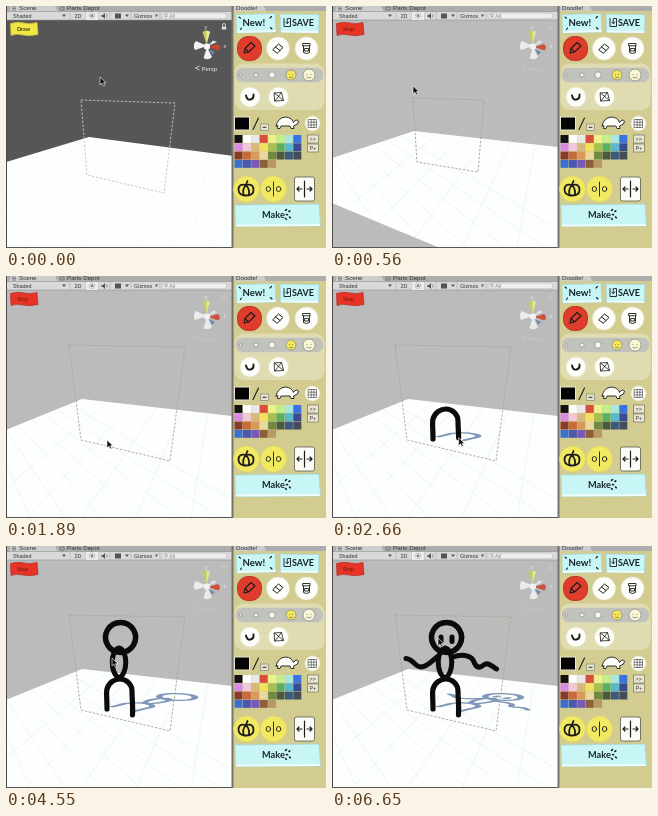
Write an HTML page that moves like this. It is 320 by 242 pixels and loops after 6.79 s.

```html
<!DOCTYPE html>
<html lang="en">
<head>
<meta charset="utf-8">
<title>Doodle in a scene</title>
<style>
  html, body { margin: 0; width: 100%; height: 100%; overflow: hidden; background: #d2cc90; }
  svg { display: block; width: 100vw; height: 100vh; }
  text { font-family: "Liberation Sans", Arial, sans-serif; font-size: 5.4px; fill: #333; }
  .hand { font-family: Lato, "Open Sans", sans-serif; font-weight: 700; fill: #16242a; }
  .line { fill: none; stroke: #1b1b1b; stroke-linecap: round; stroke-linejoin: round; }
  .round { fill: #fdfdf9; stroke: #e8e4c6; stroke-width: .8; }
  .cyan { fill: #c8f5f6; stroke: #9fd6da; stroke-width: .7; }
  .lip { fill: none; stroke: #eefcfb; stroke-width: 1.8; }
  .sun { fill: #f2e963; stroke: #dfd46c; stroke-width: .8; }
</style>
</head>
<body>
<svg viewBox="0 0 320 242" preserveAspectRatio="none">
  <defs><clipPath id="view"><rect x="1" y="14" width="225" height="227"/></clipPath></defs>

  <g clip-path="url(#view)">
    <rect id="sky" x="0" y="14" width="227" height="228"/>
    <path id="floor" fill="#fdfefe"/>
    <path id="grid" fill="none" stroke="#e9f1f4" stroke-width=".7"/>
    <path id="gap"/>
    <use href="#ink" transform="matrix(.953 .157 -.719 .164 127.7 118)" stroke="#7f97b8"/>
    <path id="sheet" fill="none" stroke-width=".9" stroke-dasharray="2.4 1.6"/>
    <g stroke="#0b0b0b"><g id="ink" fill="none" stroke-linecap="round" stroke-linejoin="round"></g></g>

    <g id="gizmo">
      <path d="M201 40L190 35Q186 39 189 44Z" fill="#f2f2f2"/>
      <path d="M201 41L197.500 52Q202 55 206 51Z" fill="#f0f0f0"/>
      <path d="M202 40L207 34.500L211 36Z" fill="#e8e8e8"/>
      <path d="M202 41L212 38Q215.500 41 212.500 44.500Z" fill="#cd4630"/>
      <path d="M203 43L209 46L206 49Z" fill="#6a86ac"/>
      <path d="M200.500 38L196.500 26Q200 23 204 26Z" fill="#c6cf52"/>
      <path d="M200.500 38L200.500 24.500Q203 24.500 204 26Z" fill="#e6e9a0"/>
      <rect x="198" y="37.500" width="6" height="6" rx="2" fill="#f7f7f7"/>
      <text x="198.500" y="22.500" style="fill:#eee">y</text>
      <text x="217.500" y="42" style="fill:#eee">x</text>
    </g>
    <g id="persp" fill="none" stroke="#e9e9e9" stroke-width=".8">
      <path d="M193.500 60L189.500 62L193.500 64"/>
      <text x="195.500" y="64.500" stroke="none" style="fill:#e9e9e9;font-size:6px">Persp</text>
      <path d="M216.500 20.500V19a1.500 1.500 0 0 1 3 0V20.500"/>
      <rect x="215.800" y="20.500" width="4.400" height="3" fill="#ddd" stroke="none"/>
    </g>
    <path id="mode" d="M4.500 17.500Q12 15.500 18 17T31 16.500L32 28.500Q24 30.500 17 29T5 29.500Z" stroke-width=".7"/>
    <text id="modeText" class="hand" x="11" y="24.800"></text>
  </g>

  <!-- window frame -->
  <rect width="320" height="6" fill="#adadad"/>
  <path d="M3 6L5 0H49L52 6Z" fill="#cdcdcd"/>
  <rect y="5.500" width="226" height="8.500" fill="#d9d9d9"/>
  <path d="M0 14H226M0 5.500H226" stroke="#909090" stroke-width=".6"/>
  <path d="M0 0V242" stroke="#4a4a4a" stroke-width="2"/>
  <path d="M0 241.500H226" stroke="#555"/>
  <path d="M6 1h4M6 2.500h4M6 4h4M54 1h4v3h-4z" stroke="#555" stroke-width=".6" fill="none"/>
  <text x="13" y="4" style="font-size:6.200px">Scene</text>
  <text x="61" y="4" style="font-size:6.200px">Parts Depot</text>
  <text x="7" y="11.500">Shaded</text>
  <path d="M56 8.500h4l-2 2.500zM119 8.500h4l-2 2.500zM149 8.500h3l-1.500 2.500z" fill="#555"/>
  <path d="M64 6V14M80 6V14M92 6V14M104 6V14M125 6V14M154 6V14" stroke="#b0b0b0" stroke-width=".6"/>
  <rect x="80" y="6" width="12" height="8" fill="#ececec"/>
  <text x="68.500" y="11.700">2D</text>
  <circle cx="86" cy="9.800" r="1.500" fill="#888"/>
  <circle cx="86" cy="9.800" r="2.800" fill="none" stroke="#888" stroke-dasharray=".9 1.300"/>
  <path d="M95.500 9h1.500l2-2v6l-2-2h-1.500zM109 7.500h6v5h-6z" fill="#555"/>
  <path d="M100.500 8.300q1.500 1.500 0 3" fill="none" stroke="#555" stroke-width=".6"/>
  <text x="128" y="11.700">Gizmos</text>
  <rect x="156" y="7" width="65" height="5.800" rx="2.900" fill="#eee" stroke="#aaa" stroke-width=".5"/>
  <circle cx="160" cy="9.500" r="1.400" fill="none" stroke="#777" stroke-width=".6"/>
  <text x="163" y="11.600" style="fill:#888">All</text>

  <!-- tool panel -->
  <rect x="226" y="5" width="94" height="237" fill="#d2cc90"/>
  <rect x="225.500" width="2" height="242" fill="#77756a"/>
  <path d="M228 0H258L260 5H228Z" fill="#cbcbcb"/>
  <text x="230" y="3.700" style="font-size:6.200px">Doodle!</text>

  <path class="cyan" d="M230 8.500L269 7.500L270 26L230.500 27Z"/>
  <path class="cyan" d="M274 8L313 8.500L312.500 26.500L274.500 26Z"/>
  <path class="lip" d="M231 26L269.500 25M275 25.500L312 26"/>
  <path class="line" d="M233 11l1.500 1.200M265.500 10.500l-1.500 1.500M234.500 23.500l1-1.500M266 23l-1.500-1.500" stroke-width="1.100"/>
  <text class="hand" x="236.500" y="20" style="font-size:9.600px">New!</text>
  <path class="line" d="M278 12.500V20.500H284.500V12.500H282.500M281.300 12.500V17.500M279.700 16l1.600 1.700l1.600-1.700" stroke-width=".9"/>
  <text class="hand" x="286" y="20" style="font-size:9px">SAVE</text>

  <rect x="231.500" y="30.500" width="24" height="24" rx="10.500" fill="#e03c2c" stroke="#c03728"/>
  <path class="line" d="M238 47L239 42.500L245 36.500L249 40L242.500 46Z M239 42.500L242.500 46" stroke-width="1.100"/>
  <circle class="round" cx="272" cy="42.500" r="11.500"/>
  <path class="line" d="M267 43.500L272.500 38L277 41.500L271.500 47Z M269.500 41l4.500 3.500" stroke-width="1"/>
  <circle class="round" cx="300.500" cy="42.500" r="11.500"/>
  <path class="line" d="M297.500 40V46.500Q300.500 48.500 303.500 46.500V40M297 37.500H304V39.800H297ZM299 42.500h3.500v2.500h-3.500z" stroke-width=".9"/>

  <rect x="228.500" y="57.500" width="90" height="46.500" rx="9" fill="#dfdcb2"/>
  <rect x="229.500" y="61.500" width="88" height="15" rx="7" fill="#c2c2bc" stroke="#d9d6bb"/>
  <g fill="#f6f6f0" stroke="#777" stroke-width=".6">
    <circle cx="234.500" cy="69" r="1.300"/><circle cx="250" cy="69" r="2.100"/><circle cx="266" cy="69" r="3.200"/>
    <circle cx="285" cy="69" r="5" fill="#f4e85a"/><circle cx="303" cy="69" r="6" fill="#f8f6d4"/>
  </g>
  <path d="M283.500 68v1M286.500 68v1M283 71q2 1.500 4 0M301 68v1M305 68v1M300.500 71q2.500 2 5 0" fill="none" stroke="#555" stroke-width=".6"/>

  <circle class="round" cx="244" cy="91" r="10"/>
  <path class="line" d="M240 89.500Q241 94.500 244.500 93.500T247.500 88.500" stroke-width="1.900"/>
  <circle class="round" cx="272.500" cy="91" r="10"/>
  <path class="line" d="M268.500 87L275.500 86.500L277.500 94.500L269 95ZM268.500 87L277.500 94.500M275.500 86.500L269 95" stroke-width=".8"/>

  <rect x="228.500" y="111" width="15" height="13" fill="#050505" stroke="#e9e6d0"/>
  <path class="line" d="M247.500 122.500L252.500 112M247 123.500l1-2" stroke-width="1.100"/>
  <rect x="254.500" y="118" width="8" height="6.500" fill="#e7e3c8" stroke="#777" stroke-width=".6"/>
  <path class="line" d="M257 121.300h3" stroke-width=".9"/>
  <path class="line" d="M270 120Q272 111.500 279.500 111Q286 111.500 287.500 116.500Q290 112.500 292.500 115Q293 118.500 287.500 120L288 122.500H285L284 120H275L274 122.500H271.500L272 120Z" style="fill:#fdfdf9" stroke-width=".9"/>
  <circle class="round" cx="306.500" cy="117.500" r="7.500"/>
  <path class="line" d="M302.500 113.500h8v8h-8zM305.200 113.500v8M307.900 113.500v8M302.500 116.200h8M302.500 118.900h8" stroke-width=".5"/>
  <g id="palette"></g>
  <g fill="#e9e6d2" stroke="#77745c" stroke-width=".7">
    <rect x="301.500" y="129" width="11" height="8"/><rect x="301.500" y="138" width="11" height="8"/>
  </g>
  <text x="303.500" y="135">&gt;&gt;</text><text x="303.500" y="144">P+</text>

  <circle class="sun" cx="240.500" cy="183" r="13"/>
  <path class="line" d="M240 179Q232.500 177 232.500 184Q233 189.500 240 189.500Q247.500 189.500 247.500 184Q247.500 177 240 179ZM240 179Q235.500 184 238 189.500M240 179Q244.500 184 242.500 189.500M240 178.500L241.500 175" stroke-width="1.800"/>
  <circle class="sun" cx="267.500" cy="183" r="13"/>
  <path class="line" d="M267.500 176V190M264.600 183a2.200 2.500 0 1 1-4.400 0a2.200 2.500 0 1 1 4.400 0M274.800 183a2.200 2.500 0 1 1-4.400 0a2.200 2.500 0 1 1 4.400 0" stroke-width=".9"/>
  <rect x="288.500" y="171" width="20" height="24" rx="2" fill="#fcfcf7" stroke="#5a584a" stroke-width=".8"/>
  <path class="line" d="M298.500 175V191M296 183H291.500M293 181L291 183L293 185M301 183H305.500M304 181L306 183L304 185" stroke-width="1.200"/>

  <path class="cyan" d="M229 199L313 198L314.500 220L229.500 220.500Z"/>
  <path class="lip" d="M230 219.500L314 219"/>
  <text class="hand" x="256" y="211.500" style="font-size:9.200px">Make</text>
  <path class="line" d="M279.500 204.500l1-1M283 205.500l.8-.6M280.500 208.500l1 .3M283.500 211l.8.8M279.500 212.500l.8.800" stroke-width="1.600"/>

  <path id="cursor" d="M0 0V8L2 6.200L3.300 9L4.700 8.400L3.500 5.700H6Z" fill="#111" stroke="#fff" stroke-width=".6"/>
</svg>

<script>
const LOOP = 6790, STEP = 70;
const $ = id => document.getElementById(id);
const set = (el, attrs) => { for (const k in attrs) el.setAttribute(k, attrs[k]); return el; };
const make = (tag, attrs, parent) =>
  parent.appendChild(set(document.createElementNS('http://www.w3.org/2000/svg', tag), attrs));
const clamp = v => Math.min(1, Math.max(0, v));
const mix = (a, b, p) => a + (b - a) * p;
const smooth = p => p * p * (3 - 2 * p);
const blend = (a, b, p) => `rgb(${a.map((v, i) => Math.round(mix(v, b[i], p)))})`;

// palette swatches, row by row
const swatches = ('111 fff e8e8e8 d8503c eef08a c4ee8c a8e6e0 3a72e0 ' +
  'd98ae8 f0c8d8 d8b878 f4e060 a8c050 58b060 58b8d0 3a4a90 ' +
  '8a3a2a c86a3a d89a58 e8d8a0 708840 4a5a40 3a5a80 444c58 ' +
  '3a70d0 4a58b0 7a58b8 8a6038 b89868').split(' ');
swatches.forEach((c, i) => make('rect', {
  x: 228.5 + i % 8 * 8.4, y: 129 + (i >> 3) * 8.3, width: 8, height: 7.9, fill: '#' + c
}, $('palette')));

// camera poses: sheet corners (8), far floor corner (2), floor height at the left
// and right border, then where the near floor edge meets the left and bottom border
const poses = [
  [280, 75, 94, 169, 97, 158, 187, 81, 169, 83, 131, 156, 150, 242, 0],
  [560, 81, 92, 152, 94, 146, 166, 85, 156, 82, 125, 152, 141, 197, 108],
  [1190, 63, 69, 179, 71, 164, 185, 75, 164, 76, 123, 154, 140, 242, 0]
];

// pen strokes: start, end, path, width
const strokes = [
  [1960, 2730, 'M101 163C101 152 100 147 101 143C103 136 109 133 114 133C121 133 126 139 126 145C126 152 127 160 126.500 169', 5.2],
  [2870, 3500, 'M113 102C104 104 104 128 113 132C122 128 122 104 113 102', 5],
  [3710, 4410, 'M114.500 106.500a15 15 0 1 1 .1 0', 5.5],
  [4620, 5000, 'M105 111C100 115 95 121 89 121C83 121 81 113 74 112.500', 5],
  [5110, 5500, 'M121 111C129 108 138 109 141 114C143 118 144 122 148 121C152 120 152 117 156 118C160 119 162 122 164.500 123', 5],
  [5740, 6020, 'M109 91V95.500', 5],
  [6230, 6440, 'M120 91V95.500', 5]
].map(([from, to, d, width]) => {
  const el = make('path', { d, 'stroke-width': width }, $('ink'));
  const len = el.getTotalLength();
  return { from, to, el, len, at: p => el.getPointAtLength(len * p) };
});

// cursor track: free moves plus the two ends of every stroke
const track = [
  [0, 94, 71], [70, 94, 71], [210, 20, 22], [350, 20, 22], [560, 81, 80],
  [1260, 90, 118], [1890, 101, 164], [3570, 113, 102], [4550, 106, 112],
  [5670, 104, 91], [6650, 106, 92], [LOOP, 106, 92]
];
for (const s of strokes)
  for (const [t, p] of [[s.from, 0], [s.to, 1]]) track.push([t, s.at(p).x, s.at(p).y]);
track.sort((a, b) => a[0] - b[0]);

function sample(keys, t) {
  if (t <= keys[0][0]) return keys[0].slice(1);
  const i = keys.findIndex(k => k[0] > t);
  if (i < 0) return keys[keys.length - 1].slice(1);
  const a = keys[i - 1], b = keys[i], p = smooth((t - a[0]) / (b[0] - a[0]));
  return a.slice(1).map((v, j) => mix(v, b[j + 1], p));
}

function drawScene(t) {
  const [ax, ay, bx, by, cx, cy, dx, dy, fx, fy, ly, ry, nearY, nearX] = sample(poses, t);
  const light = clamp((t - 210) / 280);
  const sky = blend([86, 86, 86], [187, 187, 187], light);
  set($('sky'), { fill: sky });
  set($('floor'), { d: `M0 ${ly}L${fx} ${fy}L227 ${ry}V242H0Z` });
  set($('gap'), { d: `M0 ${nearY}L${nearX} 242H0Z`, fill: sky });
  set($('sheet'), {
    d: `M${ax} ${ay}L${bx} ${by}L${cx} ${cy}L${dx} ${dy}Z`,
    stroke: blend([196, 196, 196], [166, 165, 142], light)
  });
  let d = '';
  for (let i = 1; i < 8; i++) {
    const p = i / 6;
    d += `M${mix(fx, 227, p)} ${mix(fy, ry, p)}L${-90 + i * 55} 242`;
    d += `M${mix(fx, 0, p)} ${mix(fy, ly, p)}L${300 - i * 38} ${242 + i * 3}`;
  }
  set($('grid'), { d, opacity: mix(.4, 1, light) });
  set($('gizmo'), { opacity: mix(1, .9, light) });
  set($('persp'), { opacity: mix(1, .25, light) });

  const on = t >= 280;
  set($('mode'), { fill: on ? '#e63526' : '#f3e544', stroke: on ? '#b52c22' : '#cfc23a' });
  $('modeText').textContent = on ? 'Stop' : 'Draw';
  $('modeText').style.fill = on ? '#8a1c14' : '#3a3a1a';
}

function drawInk(t) {
  let [x, y] = sample(track, t);
  for (const s of strokes) {
    const p = clamp((t - s.from) / (s.to - s.from));
    s.el.style.display = t < s.from ? 'none' : '';
    s.el.style.strokeDasharray = p < 1 ? `${s.len * p + .01} ${s.len * 2}` : 'none';
    if (p > 0 && p < 1) ({ x, y } = s.at(p));
  }
  set($('cursor'), { transform: `translate(${x} ${y})` });
}

const start = performance.now();
function tick() {
  const t = Math.floor((performance.now() - start) % LOOP / STEP) * STEP;
  drawScene(t);
  drawInk(t);
  requestAnimationFrame(tick);
}
tick();
</script>
</body>
</html>
```
